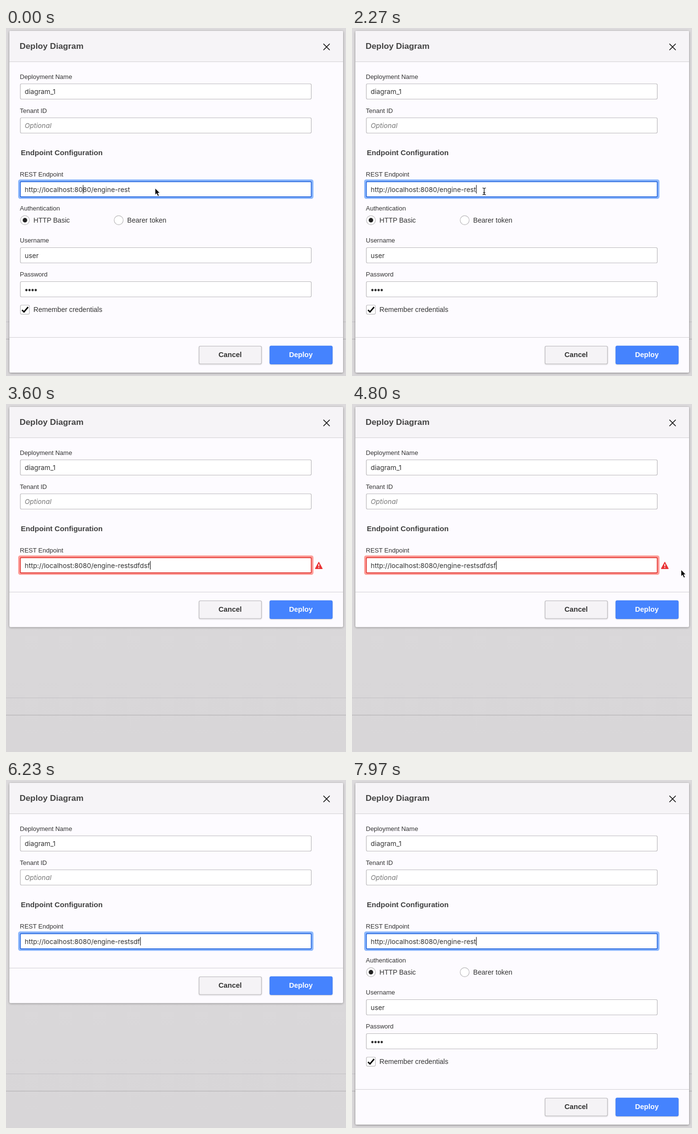
Recreate the animation shown at these times as an HTML page. Size 700 by 717 pixels, loop 8 s.

```html
<!DOCTYPE html>
<html lang="en">
<head>
<meta charset="utf-8">
<title>Deploy Diagram</title>
<style>
  html, body { margin: 0; width: 100%; height: 100%; overflow: hidden; background: #dad8da; }
  svg { display: block; width: 100vw; height: 100vh; }
  text { font-family: "Liberation Sans", Arial, sans-serif; fill: #333; white-space: pre; }
  .label { font-size: 13px; }
  .option { font-size: 14.1px; }
  .value { font-family: Inter, sans-serif; font-size: 13.78px; font-variant-ligatures: no-contextual; }
  .hint { font-style: italic; fill: #777; }
  .title { font-size: 17.3px; font-weight: bold; fill: #444; }
  .heading { font-size: 15.1px; font-weight: bold; fill: #404040; }
  .button { font-size: 14.6px; font-weight: bold; text-anchor: middle; }
  .box { fill: #fff; stroke: #bab8bb; stroke-width: 1.2; }
</style>
</head>
<body>
<svg id="stage" viewBox="0 0 700 717" xmlns="http://www.w3.org/2000/svg">
  <defs>
    <linearGradient id="page" x1="0" y1="0" x2="0" y2="1">
      <stop offset="0" stop-color="#dcdadc"/>
      <stop offset="1" stop-color="#d8d6d8"/>
    </linearGradient>
    <filter id="shadow" x="-5%" y="-5%" width="110%" height="112%">
      <feDropShadow dx="0" dy="1" stdDeviation="2" flood-color="#000" flood-opacity=".38"/>
    </filter>
    <filter id="soft" x="-5%" y="-20%" width="110%" height="150%">
      <feDropShadow dx="0" dy="1" stdDeviation="1" flood-color="#000" flood-opacity=".18"/>
    </filter>
  </defs>

  <rect width="700" height="717" fill="url(#page)"/>
  <path d="M0 605.5H700" stroke="#c3c1c4"/>
  <path d="M0 641H700" stroke="#adabae" stroke-width="1.2"/>

  <rect id="panel" x="7" y="6" width="687" height="704" rx="3" fill="#fdfbff" filter="url(#shadow)"/>
  <path d="M7 69V9q0-3 3-3H691q3 0 3 3V69Z" fill="#f6f4f7"/>
  <path d="M7 69.5H694" stroke="#d2d0d3"/>
  <text class="title" x="28" y="43">Deploy Diagram</text>
  <path d="M654 33l12 12m0-12l-12 12" stroke="#111" stroke-width="1.7" stroke-linecap="round"/>

  <g id="fields"></g>
  <text class="heading" x="30.5" y="262">Endpoint Configuration</text>
  <text class="label" x="28.5" y="306">REST Endpoint</text>
  <rect id="ring" x="25" y="312" width="608" height="40" rx="4.5"/>
  <rect id="focus" x="29.5" y="316.5" width="599" height="31.5" rx="2" fill="#fff" stroke-width="1.8"/>
  <text id="url" class="value" x="38.5" y="337.5"></text>
  <rect id="caret" y="323.5" width="1.1" height="17.5" fill="#111"/>

  <g id="auth">
    <text class="label" x="28.5" y="376">Authentication</text>
    <circle class="box" cx="39" cy="396" r="9.3"/>
    <circle cx="39" cy="396" r="4.7" fill="#222"/>
    <text class="option" x="56.5" y="401">HTTP Basic</text>
    <circle class="box" cx="232" cy="396" r="9.3"/>
    <text class="option" x="249.5" y="401">Bearer token</text>
    <g id="login"></g>
    <g id="dots" fill="#333"></g>
    <rect class="box" x="29.6" y="571" width="18.6" height="18.6" rx="2.5"/>
    <path d="M33 581l4 4 8.5-10" fill="none" stroke="#000" stroke-width="2.8"/>
    <text class="option" x="56.5" y="585">Remember credentials</text>
  </g>

  <g id="footer">
    <path d="M7 637.5H694" stroke="#d2d0d3"/>
    <rect x="397.5" y="655.5" width="128.5" height="36.5" rx="2.5" fill="#f5f3f6" stroke="#b9b7ba" stroke-width="1.2" filter="url(#soft)"/>
    <text class="button" x="461.5" y="678.3">Cancel</text>
    <rect x="543" y="655" width="129" height="37.5" rx="2.5" fill="#4583fe" stroke="#3c78f0" stroke-width=".8" filter="url(#soft)"/>
    <text class="button" x="607" y="678.3" style="fill:#fff">Deploy</text>
  </g>

  <g id="alert">
    <path d="M644 326l7 13.2H637Z" fill="#e93436" stroke="#e93436" stroke-width="1.6" stroke-linejoin="round"/>
    <path d="M644 329.8v4.6" stroke="#fff" stroke-width="1.8"/>
    <circle cx="644" cy="337" r="1.05" fill="#fff"/>
  </g>
  <g id="tip">
    <path d="M306.5 347.5H637.5l6.5-6 6.5 6H663.500q3 0 3 3V378.500q0 3-3 3H306.500q-3 0-3-3V350.500q0-3 3-3Z"
      fill="#fdfcfe" stroke="#c6c4c7" filter="url(#soft)"/>
    <text class="option" x="314.500" y="369" style="font-size:14px">Should point to a running Dopumbe Engine REST API.</text>
  </g>

  <path id="arrow" d="M0 0V13.800l3.100-2.900 2.500 5.700 2.600-1.100-2.500-5.500H9.800Z" fill="#000" stroke="#fff" stroke-width=".9"/>
  <g id="beam" fill="none" stroke-linecap="round">
    <path d="M-3-7q2.500 0 3 1.800q.5-1.800 3-1.800M-3 7q2.500 0 3-1.800q.5 1.800 3 1.800M0-5V5M-1.800 2.500h3.600" stroke="#fff" stroke-width="3.200"/>
    <path d="M-3-7q2.500 0 3 1.800q.5-1.800 3-1.800M-3 7q2.500 0 3-1.800q.5 1.800 3 1.800M0-5V5M-1.800 2.500h3.600" stroke="#111" stroke-width="1.300"/>
  </g>
</svg>
<script>
  const $ = id => document.getElementById(id);
  const LOOP = 8000;
  const BASE = "http://localhost:8080/engine-rest";
  const EXTRA = "sdfdsf";
  const TYPE_START = 2970, TYPE_STEP = 20;
  const CLICK = 2100, FAIL = 3600, RECOVER = 7730;
  const DELETES = [6000, 6100, 6200, 6370, 6530, 6600];
  const BLINK_STARTS = [-270, CLICK, TYPE_START, 3070, FAIL, ...DELETES];

  // Pointer path: time, x, y
  const PATH = [
    [0, 307, 330], [230, 300, 333], [370, 300, 333], [800, 18, 318],
    [1170, 110, 338], [1370, 144, 341], [2000, 270, 337], [2600, 275, 336],
    [2970, 275, 336], [3970, 699, 352], [4370, 689, 344], [4600, 689, 344],
    [5200, 645, 334], [5430, 645, 334], [5630, 613, 329], [5900, 570, 332]
  ];

  const field = (label, y, value, hint = "") => `
    <text class="label" x="28.5" y="${y - 10.5}">${label}</text>
    <rect class="box" x="29.5" y="${y}" width="599" height="31.5" rx="2.5"/>
    <text class="value ${hint}" x="38.5" y="${y + 21}">${value}</text>`;

  $("fields").innerHTML =
    field("Deployment Name", 115, "diagram_1") + field("Tenant ID", 185, "Optional", "hint");
  $("login").innerHTML = field("Username", 452.5, "user") + field("Password", 522.5, "");
  $("dots").innerHTML = [0, 1, 2, 3]
    .map(i => `<circle cx="${42 + i * 6.4}" cy="540" r="2.4"/>`).join("");

  const show = (id, on) => $(id).setAttribute("visibility", on ? "visible" : "hidden");

  function extraCount(t) {
    if (t < TYPE_START) return 0;
    const typed = Math.floor((t - TYPE_START) / TYPE_STEP) + 1;
    return Math.min(EXTRA.length, typed) - DELETES.filter(d => t >= d).length;
  }

  function pointerAt(t) {
    const next = PATH.findIndex(p => p[0] > t);
    if (next < 0) return PATH[PATH.length - 1].slice(1);
    const [t0, x0, y0] = PATH[next - 1], [t1, x1, y1] = PATH[next];
    const k = (t - t0) / (t1 - t0);
    const e = k * k * (3 - 2 * k);
    return [x0 + (x1 - x0) * e, y0 + (y1 - y0) * e];
  }

  function drawField(t, failed) {
    const text = BASE + EXTRA.slice(0, extraCount(t));
    const url = $("url");
    if (url.textContent !== text) url.textContent = text;
    const index = t < CLICK ? 19 : text.length;
    $("caret").setAttribute("x", 38.8 + url.getSubStringLength(0, index));
    const since = t - BLINK_STARTS.filter(s => s <= t).pop();
    show("caret", since % 1000 < 500);
    $("ring").setAttribute("fill", failed ? "#fd9f9b" : "#8db8fc");
    $("focus").setAttribute("stroke", failed ? "#e33a35" : "#2c6ce0");
  }

  function drawPointer(t) {
    const visible = t < TYPE_START || (t >= 3970 && t < DELETES[0]);
    const [x, y] = pointerAt(t);
    const inField = t >= 370 && x > 29 && x < 629;
    show("beam", visible && inField);
    show("arrow", visible && !inField);
    for (const id of ["beam", "arrow"]) $(id).setAttribute("transform", `translate(${x} ${y})`);
  }

  function draw(t) {
    const failed = t >= FAIL && t < DELETES[0];
    const short = t >= FAIL && t < RECOVER;
    show("auth", !short);
    show("alert", failed);
    show("tip", failed && t >= 5000);
    $("panel").setAttribute("height", short ? 453.500 : 704);
    $("footer").setAttribute("transform", `translate(0 ${short ? -250 : 0})`);
    drawField(t, failed);
    drawPointer(t);
  }

  const start = performance.now();
  function tick() {
    draw((performance.now() - start) % LOOP);
    requestAnimationFrame(tick);
  }
  tick();
</script>
</body>
</html>
```
